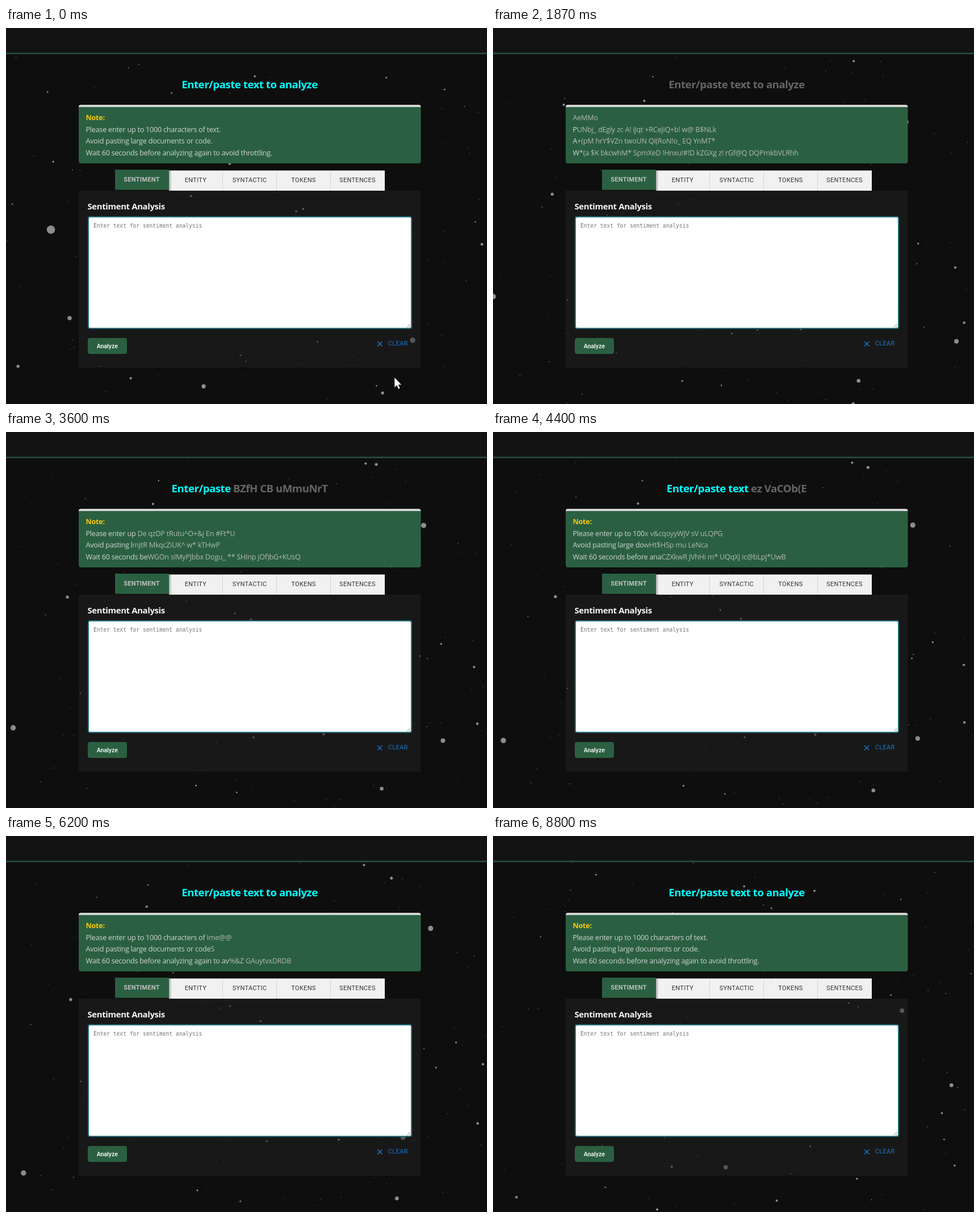
Animation, 847 px wide and 661 px high, one loop 8.87 s. Source, as an HTML page:

```html
<!DOCTYPE html>
<html lang="en">
<head>
<meta charset="utf-8">
<title>Text analysis</title>
<style>
html, body { margin: 0; width: 100%; height: 100%; overflow: hidden; background: #0e0e0e; }
svg { display: block; width: 847px; height: 661px; }
text { white-space: pre; font-family: "Open Sans", "Noto Sans", sans-serif; }
.title { font-size: 18.6px; font-weight: 700; letter-spacing: -.45px; fill: #666; text-anchor: middle; }
.line { font-size: 12.6px; letter-spacing: -.23px; fill: #b3b8b3; }
.done { fill: #d3d3d3; }
.note { fill: #f5c80f; font-weight: 700; }
.head { font-size: 14.9px; font-weight: 700; letter-spacing: -.36px; fill: #f5f5f5; }
.hint { font: 9.64px "DejaVu Sans Mono", monospace; fill: #757575; }
.ui { font-family: Roboto, sans-serif; font-size: 11px; letter-spacing: .3px; }
.tab { text-anchor: middle; fill: #333; }
.active { fill: #c0c0c0; font-weight: 700; }
.button { font: 500 10.6px Roboto, sans-serif; text-anchor: middle; fill: #fff; }
</style>
</head>
<body>
<svg viewBox="0 0 847 661">
  <defs>
    <linearGradient id="shade">
      <stop offset="0" stop-color="#000" stop-opacity=".3"/>
      <stop offset="1" stop-color="#000" stop-opacity="0"/>
    </linearGradient>
  </defs>
  <rect width="847" height="661" fill="#0e0e0e"/>
  <g id="stars" fill="#8c8c8c"></g>
  <rect width="847" height="44" fill="#131313"/>
  <rect y="43.5" width="847" height="2.5" fill="#28503e"/>

  <text id="title" class="title" x="429" y="106.4"></text>

  <rect x="128" y="135" width="602.5" height="103" rx="4" fill="#2a6041"/>
  <path d="M128 139a4 4 0 0 1 4-4H726.5a4 4 0 0 1 4 4Z" fill="#d3d3d3"/>
  <g id="lines"></g>

  <rect x="128" y="286" width="602.5" height="311" fill="#222" fill-opacity=".5"/>
  <g id="tabs">
    <rect x="287" y="250.5" width="380" height="35.5" fill="#f1f1f1"/>
    <rect x="287" y="250.5" width="5" height="35.5" fill="url(#shade)"/>
    <path d="M381.5 250.5V286M476.5 250.5V286M571.5 250.5V286" stroke="#d5d5d5"/>
    <rect x="192" y="249" width="95" height="35.5" fill="#2a6041"/>
  </g>

  <text class="head" x="143.5" y="318.5">Sentiment Analysis</text>
  <rect x="145" y="332" width="569" height="196" rx="3" fill="#fff" stroke="#2a7380" stroke-width="2"/>
  <path d="M706 526l5.5-5.5M709.5 526l2-2" stroke="#666" stroke-width=".8"/>
  <text class="hint" x="154" y="351">Enter text for sentiment analysis</text>

  <rect x="144" y="545" width="69" height="28" rx="4" fill="#2a6041"/>
  <text class="button" x="178.3" y="562.8">Analyze</text>
  <path d="M654 551l8.4 8.4M662.4 551l-8.4 8.4" stroke="#1976d2" stroke-width="1.4"/>
  <text class="ui" x="672.8" y="558.2" fill="#1976d2">CLEAR</text>

  <path id="cursor" d="M0 0V18.2L4.2 14.4L7 20.8L10 19.5L7.2 13.2H12.6Z" fill="#fff" stroke="#111" stroke-width=".6"/>
</svg>
<script>
const LOOP = 8870, START = 1800, RESET = 6600, STEP = 1000 / 15;
const W = 847, H = 661, TOP = 46;
const $ = id => document.getElementById(id);

function add(parent, tag, attrs = {}, text = "") {
  const el = document.createElementNS("http://www.w3.org/2000/svg", tag);
  for (const k in attrs) el.setAttribute(k, attrs[k]);
  el.textContent = text;
  return parent.appendChild(el);
}

const mod = (a, n) => ((a % n) + n) % n;
const clamp = (v, lo, hi) => Math.max(lo, Math.min(hi, v));

function random(seed) {
  return () => {
    seed = (seed + 0x6D2B79F5) | 0;
    let n = Math.imul(seed ^ (seed >>> 15), seed | 1);
    n ^= n + Math.imul(n ^ (n >>> 7), n | 61);
    return ((n ^ (n >>> 14)) >>> 0) / 4294967296;
  };
}

// A drifting star field, shown from one reset to the next.
// The few biggest stars are given: x, y, radius, velocity in px/s.
function makeSky(seed, from, to, big) {
  const rnd = random(seed);
  const drift = () => (rnd() - .5) * 22;
  const group = add($("stars"), "g");
  const stars = big.map(([x, y, r, vx, vy]) => ({ x, y, r, vx, vy }));
  for (let i = 0; i < 130; i++) {
    stars.push({
      x: rnd() * W, y: TOP + rnd() * (H - TOP), r: .55 + 2.2 * rnd() ** 6,
      vx: drift(), vy: drift(), wrap: true
    });
  }
  for (const s of stars) s.el = add(group, "circle", { r: s.r });
  return { from, to, group, stars };
}

const skies = [
  makeSky(41, 0, START, [
    [79, 354.5, 7.3, 8, 5], [716, 549, 4.7, 10, -6], [348, 630, 3.7, -6, 4], [112, 510, 3.7, -8, 3]]),
  makeSky(58, START, RESET, [
    [0, 470, 4.7, 7, 27.8], [818, 551, 4, -27, -4.7], [643, 620, 3.3, 10.3, 3.9], [727, 165.5, 4.6, 4.7, -.7]]),
  makeSky(75, RESET, LOOP, [
    [329, 575, 3.8, 36.7, 3.3], [112, 288, 4.6, 30, -25], [741, 307, 4, -9.4, 0], [745, 421, 3.3, 28.3, 7.8]])
];

function drawSky({ from, to, group, stars }, t) {
  const on = t >= from && t < to;
  group.style.display = on ? "" : "none";
  if (!on) return;
  const sec = (t - from) / 1000;
  for (const s of stars) {
    let x = s.x + s.vx * sec, y = s.y + s.vy * sec;
    if (s.wrap) {
      x = mod(x, W);
      y = TOP + mod(y - TOP, H - TOP);
    }
    s.el.setAttribute("cx", x.toFixed(2));
    s.el.setAttribute("cy", y.toFixed(2));
  }
}

const GLYPHS = "ABCDEFGHIJKLMNOPQRSTUVWXYZabcdefghijklmnopqrstuvwxyz!@#$%^&*()_+";

function scramble(text, seed) {
  const rnd = random(seed * 7919);
  return text.replace(/\S/g, () => GLYPHS[Math.floor(rnd() * GLYPHS.length)]);
}

// Letters revealed so far, one per `rate` ms; fractional
function progress(t, { text, rate }) {
  return t < START ? text.length : Math.min(text.length, (t - START) / rate + .5);
}

const lines = [
  { text: "Note:", rate: 153, style: "note" },
  { text: "Please enter up to 1000 characters of text.", rate: 118, style: "done" },
  { text: "Avoid pasting large documents or code.", rate: 118, style: "done" },
  { text: "Wait 60 seconds before analyzing again to avoid throttling.", rate: 100, style: "done" }
];
lines.forEach((line, i) => {
  const el = add($("lines"), "text", { class: "line", x: 140.5, y: 162 + i * 20.5 });
  line.done = add(el, "tspan", { class: line.style });
  line.rest = add(el, "tspan");
});

const title = {
  text: "Enter/paste text to analyze", rate: 153,
  done: add($("title"), "tspan", { fill: "#0ff" }),
  last: add($("title"), "tspan"),
  rest: add($("title"), "tspan")
};

function drawLine(line, i, t, tick) {
  const n = Math.floor(progress(t, line));
  line.done.textContent = line.text.slice(0, n);
  line.rest.textContent = scramble(line.text.slice(n), tick * 5 + i);
}

// The newest title letter flashes white before it turns cyan
function drawTitle(t, tick) {
  const { text, done, last, rest } = title;
  const p = progress(t, title), n = Math.floor(p);
  const cut = n < text.length ? Math.max(0, n - 1) : n;
  const red = Math.round(255 * (1 - (p - n)));
  done.textContent = text.slice(0, cut);
  last.textContent = text.slice(cut, n);
  last.setAttribute("fill", `rgb(${red},255,255)`);
  rest.textContent = n ? scramble(text.slice(n), tick * 5 + 4) : text;
}

["SENTIMENT", "ENTITY", "SYNTACTIC", "TOKENS", "SENTENCES"].forEach((name, i) => {
  add($("tabs"), "text", {
    class: i ? "ui tab" : "ui tab active", x: 239 + i * 95, y: i ? 271.2 : 269.7
  }, name);
});

function drawCursor(t) {
  const p = clamp((t - 250) / 500, 0, 1);
  const ease = p * p * (3 - 2 * p);
  $("cursor").setAttribute("transform", `translate(${684 + 20 * ease} ${614 + 50 * ease})`);
  $("cursor").style.display = p < 1 ? "" : "none";
}

function draw(t) {
  const tick = Math.floor(t / STEP + .1);
  skies.forEach(sky => drawSky(sky, t));
  lines.forEach((line, i) => drawLine(line, i, t, tick));
  drawTitle(t, tick);
  drawCursor(t);
}

const begin = performance.now();
function loop() {
  draw((performance.now() - begin) % LOOP);
  requestAnimationFrame(loop);
}
draw(0);
requestAnimationFrame(loop);
</script>
</body>
</html>
```
